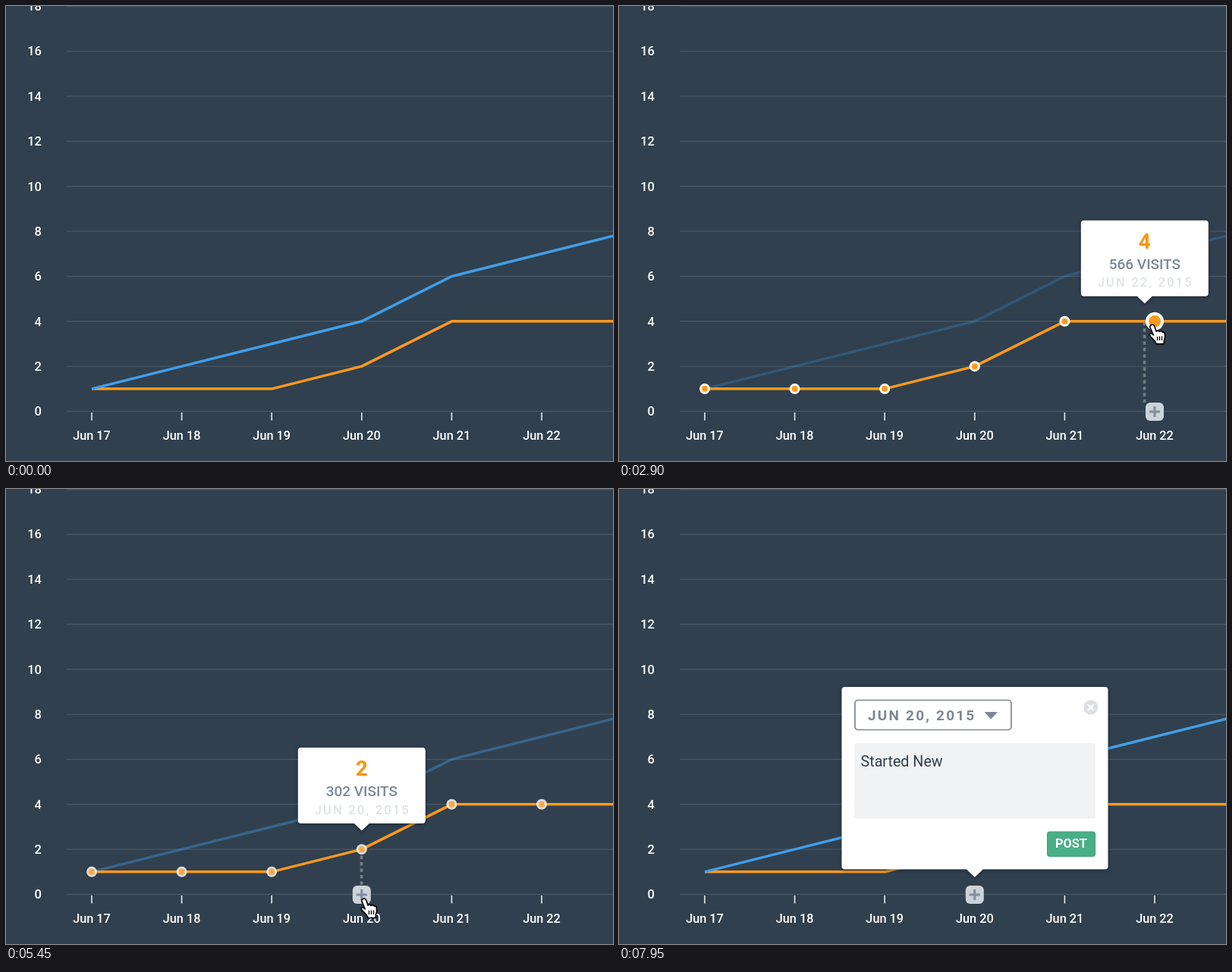
Animation of 800 by 600 pixels, one loop 8 s. Source, as an HTML page with a canvas:

```html
<!DOCTYPE html>
<html lang="en">
<head>
<meta charset="utf-8">
<title>Visits chart</title>
<style>
html, body { margin: 0; width: 100%; height: 100%; overflow: hidden; background: #30404e; }
canvas { display: block; }
</style>
</head>
<body>
<canvas id="stage" width="800" height="600"></canvas>
<script>
const ctx = document.getElementById('stage').getContext('2d');
const LOOP = 8000;
const BG = '#30404e', BLUE = '#429eea', ORANGE = '#fb9a1f', GREY = '#7d8794';
const blueValues = [1, 2, 3, 4, 6, 7, 8];
const orangeValues = [1, 1, 1, 2, 4, 4, 4];
const visits = { 3: 302, 4: 440, 5: 566 };
const note = 'Started New';

const px = day => 113 + day * 118.6;
const py = value => 534.5 - value * 29.67;
const clamp = v => Math.min(1, Math.max(0, v));
const ramp = (t, from, to) => clamp((t - from) / (to - from));
const easeOut = f => 1 - (1 - f) ** 3;
const easeInOut = f => (1 - Math.cos(Math.PI * f)) / 2;

// Keys are [time, x, y]; the value holds outside the first and last key.
function track(t, keys, ease) {
  let i = 0;
  while (i < keys.length - 2 && t >= keys[i + 1][0]) i++;
  const [t0, x0, y0] = keys[i], [t1, x1, y1] = keys[i + 1];
  const f = ease(ramp(t, t0, t1));
  return [x0 + (x1 - x0) * f, y0 + (y1 - y0) * f];
}

const tooltipKeys = [
  [1350, 560, 215], [1950, 587.6, 282.7], [2600, 587.6, 282.7], [3180, 706, 282.7],
  [3400, 706, 282.7], [3855, 587.6, 282.7], [4435, 468.8, 341]
];
const cursorKeys = [
  [500, 802, 330], [1500, 586, 413], [2350, 586, 413], [2800, 698, 419], [3050, 698, 419],
  [3550, 586, 417], [4050, 465, 470], [4700, 465, 470], [5250, 467, 539]
];

function text(str, x, y, size, color, { weight = 500, align = 'center', spacing = 0 } = {}) {
  ctx.font = `${weight} ${size}px Roboto, sans-serif`;
  ctx.letterSpacing = spacing + 'px';
  ctx.textAlign = align;
  ctx.fillStyle = color;
  ctx.fillText(str, x, y);
}

function line(points, color, width) {
  ctx.beginPath();
  points.forEach(([x, y]) => ctx.lineTo(x, y));
  ctx.strokeStyle = color;
  ctx.lineWidth = width;
  ctx.stroke();
}

function box(x, y, w, h, r, fill) {
  ctx.beginPath();
  ctx.roundRect(x, y, w, h, r);
  ctx.fillStyle = fill;
  ctx.fill();
}

function disc(x, y, r, fill) {
  ctx.beginPath();
  ctx.arc(x, y, r, 0, 7);
  ctx.fillStyle = fill;
  ctx.fill();
}

function faded(alpha, draw) {
  if (alpha <= 0) return;
  ctx.save();
  ctx.globalAlpha = alpha;
  draw();
  ctx.restore();
}

// White card with a pointer below its bottom edge.
function card(x, y, w, h, tipX, tipHalf, tipHeight) {
  ctx.save();
  ctx.shadowColor = 'rgba(10,20,35,.6)';
  ctx.shadowBlur = 4;
  ctx.shadowOffsetY = 1;
  ctx.beginPath();
  ctx.roundRect(x, y, w, h, 4);
  ctx.moveTo(tipX + tipHalf, y + h);
  ctx.lineTo(tipX, y + h + tipHeight);
  ctx.lineTo(tipX - tipHalf, y + h);
  ctx.closePath();
  ctx.fillStyle = '#fff';
  ctx.fill('nonzero');
  ctx.restore();
}

function drawAxes() {
  for (let v = 0; v <= 18; v += 2) {
    line([[80, py(v)], [800, py(v)]], '#465661', 1.4);
    text(v, 47, py(v) + 5.7, 16.5, '#fff', { align: 'right' });
  }
  for (let d = 0; d < 6; d++) {
    line([[px(d), 536], [px(d), 546.5]], '#e8ebee', 1.6);
    text('Jun ' + (17 + d), px(d), 571.7, 16.3, '#fff');
  }
}

function drawSeries(values, color) {
  ctx.lineJoin = 'round';
  line(values.map((v, d) => [px(d), py(v)]), color, 3.5);
}

function drawDots(active) {
  orangeValues.forEach((v, d) => {
    const on = d === active;
    disc(px(d), py(v), on ? 12 : 7, '#fff');
    disc(px(d), py(v), on ? 8 : 4, ORANGE);
  });
}

function drawPlus(x) {
  box(x - 12, 523, 24, 24, 6, '#ccd3d9');
  line([[x - 7, 535], [x + 7, 535]], '#8390a0', 3.2);
  line([[x, 528], [x, 542]], '#8390a0', 3.2);
}

function drawTooltip(x, y, day) {
  card(x - 84, y, 168, 100, x, 10, 9.5);
  text(orangeValues[day], x, y + 37, 28, '#f99512', { weight: 700 });
  text(visits[day] + ' VISITS', x, y + 64, 19, GREY);
  text(`JUN ${17 + day}, 2015`, x + 1, y + 87.5, 16.5, '#dfe2e6', { spacing: 2.2 });
}

function drawPopup(t) {
  card(293.5, 261, 351, 240.5, 468.8, 11, 10.5);
  ctx.beginPath();
  ctx.roundRect(311, 278.5, 206, 39, 4);
  ctx.strokeStyle = GREY;
  ctx.lineWidth = 1.7;
  ctx.stroke();
  text('JUN 20, 2015', 328, 304.7, 19, GREY, { weight: 700, align: 'left', spacing: 2.2 });
  ctx.beginPath();
  ctx.moveTo(481.5, 294);
  ctx.lineTo(499, 294);
  ctx.lineTo(490.2, 303.5);
  ctx.fill();

  disc(621.7, 288, 9.6, '#dcdfe3');
  line([[617.7, 284], [625.7, 292]], '#fff', 2);
  line([[625.7, 284], [617.7, 292]], '#fff', 2);

  box(310, 335, 318, 99.5, 3, '#f1f2f4');
  const typed = note.slice(0, Math.max(0, Math.floor((t - 6300) / 150)));
  text(typed, 318.5, 366, 19.7, BG, { weight: 400, align: 'left' });
  const caretX = 319.5 + ctx.measureText(typed).width;
  const caretOn = Math.floor((t - 5720) / 530) % 2 === 1;
  if (caretOn) line([[caretX, 348.5], [caretX, 371]], '#1c2630', 1.6);

  box(564, 451.5, 64, 33.5, 4, '#3b9f77');
  box(565, 452.5, 62, 31.5, 3, '#48af86');
  text('POST', 596, 473.2, 16.3, '#fff', { weight: 700 });
}

const hand = new Path2D('M3 2C5 .3 7 1.3 8 4L10 10C12 8.5 13.5 9 14 10.5C15.5 9 17.5 9.5 18 11' +
  'C20 10.5 21 11.5 21.3 13C22 17 21.5 20 20.3 22.5L20.3 26.5H10L8.8 23.5C6 20.5 3.5 18 1.8 15.8' +
  'C.5 13.5 2.5 12 4.3 13.2L6.3 15L2 5C1.5 3.5 2 2.5 3 2Z');
const knuckles = new Path2D('M11.5 17v5M14.5 16.5v5.5M17.5 16.5v5.5');

function drawCursor(x, y) {
  ctx.save();
  ctx.translate(x, y);
  ctx.lineJoin = 'round';
  ctx.shadowColor = 'rgba(0,0,0,.4)';
  ctx.shadowBlur = 3;
  ctx.shadowOffsetY = 1;
  ctx.fillStyle = '#fff';
  ctx.fill(hand);
  ctx.shadowColor = 'transparent';
  ctx.strokeStyle = '#000';
  ctx.lineWidth = 1.6;
  ctx.stroke(hand);
  ctx.lineWidth = 1.3;
  ctx.stroke(knuckles);
  ctx.restore();
}

function draw(t) {
  const day = t < 2600 ? 4 : t < 3400 ? 5 : t < 3855 ? 4 : 3;
  const hover = ramp(t, 1000, 1250) - ramp(t, 5380, 5750);
  const tipAlpha = ramp(t, 1350, 1500) - ramp(t, 5700, 5800);
  const [tipX, tipY] = track(t, tooltipKeys, easeOut);

  ctx.fillStyle = BG;
  ctx.fillRect(0, 0, 800, 600);
  drawAxes();

  faded(tipAlpha * 0.32, () => {
    ctx.setLineDash([4.5, 4]);
    line([[tipX - 0.3, tipY + 134], [tipX - 0.3, 523]], '#fff', 3.6);
  });
  drawSeries(orangeValues, ORANGE);
  faded(1 - 0.75 * hover, () => drawSeries(blueValues, BLUE));
  faded(hover, () => drawDots(t >= 1350 && t < 4950 ? day : -1));
  faded(ramp(t, 1350, 1450), () => drawPlus(px(day)));
  faded(tipAlpha, () => drawTooltip(tipX, tipY, day));
  faded(ramp(t, 5750, 5900), () => drawPopup(t));
  if (t >= 500 && t < 6450) drawCursor(...track(t, cursorKeys, easeInOut));
}

const start = performance.now();
function tick() {
  draw((performance.now() - start) % LOOP);
  requestAnimationFrame(tick);
}
tick();
</script>
</body>
</html>
```
